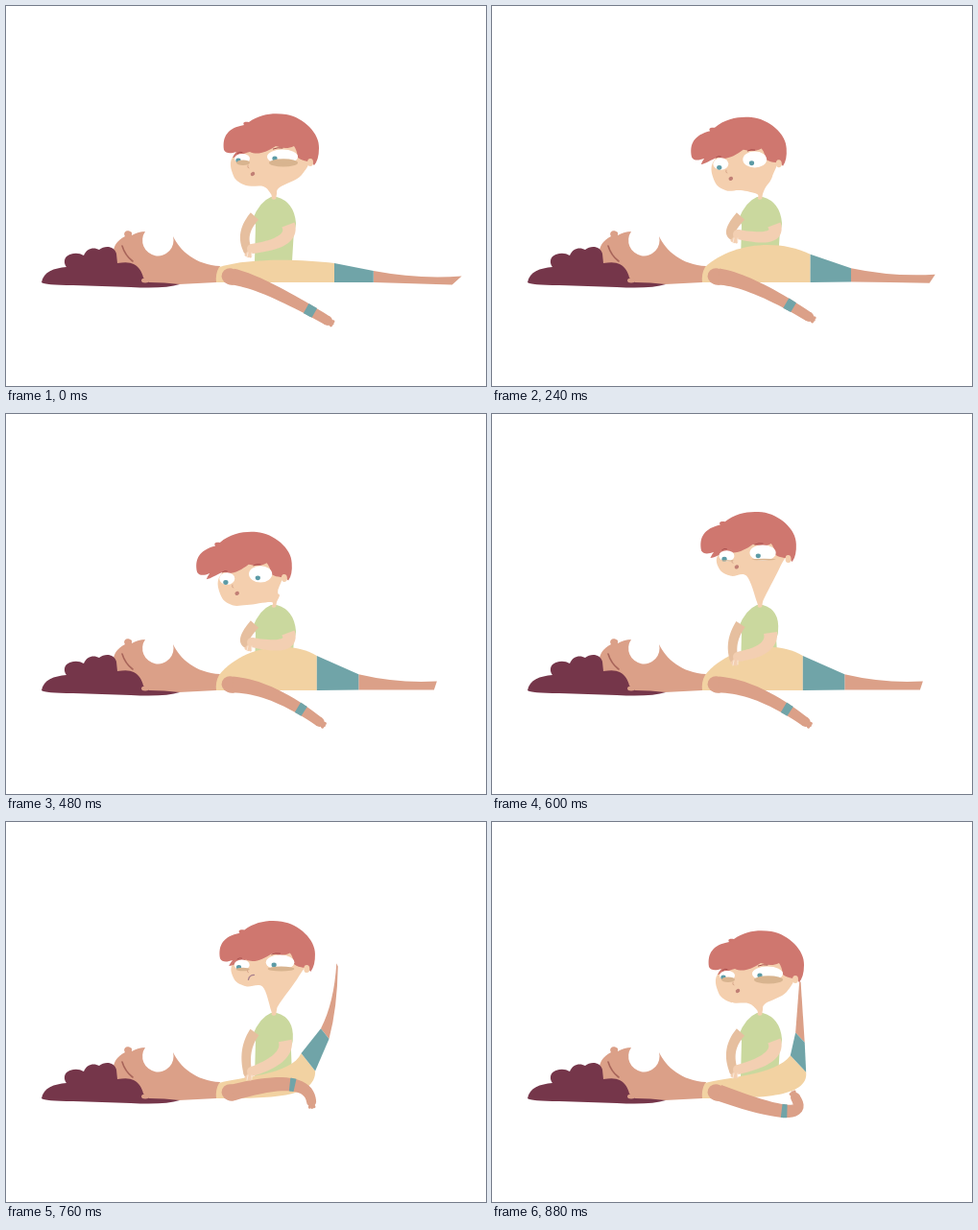
An HTML page with a canvas for the animation above (0.92 s loop, 500 by 396 pixels).

```html
<!DOCTYPE html>
<html lang="en">
<head>
<meta charset="utf-8">
<title>First aid</title>
<style>
html, body { margin: 0; width: 100%; height: 100%; overflow: hidden; background: #fff; }
canvas { display: block; width: 500px; height: 396px; }
</style>
</head>
<body>
<canvas id="stage" width="500" height="396"></canvas>
<script>
const ctx = document.getElementById('stage').getContext('2d');
const LOOP = 920, STEP = 40;
const C = {
  tan: '#dba088', tanDark: '#a8655a', maroon: '#75364a', cream: '#f2d2a2', teal: '#70a4a8',
  red: '#cf776f', redDark: '#a94f4d', pale: '#f4cfae', arm: '#f3cfb2', armDark: '#e6bf9f',
  shirt: '#cad89e', bag: '#d8b48f', iris: '#5c9ba6'
};

// x, y: head shift; turn: face shift inside the head; jaw: face height;
// hand: height of the pressing hands; hump: belly rise; swing: legs thrown up
const KEYS = [
  { at: 0, x: 0, y: 0, turn: 0, jaw: 1, hand: 255, hump: 0, swing: 0 },
  { at: 120, x: 0, y: -2, turn: 0, jaw: 1, hand: 247, hump: 1, swing: 0 },
  { at: 240, x: -19, y: 4, turn: 12, jaw: 1, hand: 240, hump: .4, swing: 0 },
  { at: 480, x: -28, y: 11, turn: 13, jaw: 1, hand: 240, hump: .7, swing: 0 },
  { at: 600, x: -9, y: -10, turn: 8, jaw: .75, hand: 255, hump: .7, swing: 0 },
  { at: 760, x: -4, y: -9, turn: 4, jaw: .8, hand: 262, hump: 0, swing: .7 },
  { at: 880, x: -1, y: 1, turn: 0, jaw: 1, hand: 260, hump: 0, swing: 1 }
];

const { PI, sin, cos, sqrt, max } = Math;
const mix = (a, b, k) => a + (b - a) * k;

function poseAt(t) {
  const i = KEYS.findLastIndex(k => k.at <= t);
  const a = KEYS[i], b = KEYS[i + 1] || a;
  const u = a === b ? 0 : (t - a.at) / (b.at - a.at);
  const k = u * u * (3 - 2 * u), pose = {};
  for (const name in a) pose[name] = mix(a[name], b[name], k);
  pose.lift = sin(pose.swing * PI / 2);
  return pose;
}

function fill(path, color) {
  ctx.fillStyle = color;
  ctx.fill(new Path2D(path));
}

function line(path, color, width) {
  ctx.strokeStyle = color;
  ctx.lineWidth = width;
  ctx.lineCap = 'round';
  ctx.stroke(new Path2D(path));
}

function oval([x, y], rx, ry, color, turn = 0) {
  ctx.beginPath();
  ctx.ellipse(x, y, rx, ry, turn, 0, PI * 2);
  ctx.fillStyle = color;
  ctx.fill();
}

// closed smooth outline through points
function blob(pts, color) {
  const at = i => pts[(i + pts.length) % pts.length];
  let d = `M${at(0)}`;
  pts.forEach((q, i) => {
    const p = at(i - 1), r = at(i + 1), s = at(i + 2);
    const c1 = q.map((c, k) => c + (r[k] - p[k]) / 6);
    const c2 = r.map((c, k) => c - (s[k] - q[k]) / 6);
    d += `C${c1} ${c2} ${r}`;
  });
  fill(d + 'Z', color);
}

// tapered limb along a quadratic, optionally only a part of it
function limb([p, q, r], w0, w1, color, from = 0, to = 1) {
  const left = [], right = [], N = 20;
  for (let i = 0; i <= N; i++) {
    const t = mix(from, to, i / N), w = mix(w0, w1, t) / 2;
    const [x, y] = [0, 1].map(k => mix(mix(p[k], q[k], t), mix(q[k], r[k], t), t));
    const [dx, dy] = [0, 1].map(k => mix(q[k] - p[k], r[k] - q[k], t));
    const n = w / Math.hypot(dx, dy);
    left.push([x + dy * n, y - dx * n]);
    right.unshift([x - dy * n, y + dx * n]);
  }
  fill('M' + left.concat(right).join('L') + 'Z', color);
}

function fingers([x, y], a, size, color) {
  for (const spread of [-.4, 0, .4]) {
    line(`M${x} ${y}l${cos(a + spread) * size} ${sin(a + spread) * size}`, color, 3);
  }
}

function lyingHead() {
  fill('M112 258Q111 247 124 240C121 235 127 232 131 236L131 239Q138 235 145 235' +
    'A16.2 16.2 0 1 0 174 240C181 255 198 270 223 271L219 288L180 290L146 290L118 275Z', C.tan);
  fill('M37 288C39 277 50 273 63 272C60 268 59 260 70 258Q76 257 81 260C84 252 92 251 97 254' +
    'C103 249 113 250 115 258L116 268Q128 266 133 269C139 272 142 278 143 283L149 288' +
    'Q165 288 181 290Q165 295 130 293L70 291Q40 291 37 288Z', C.maroon);
  oval([145, 286], 4, 2.5, C.tan);
  line('M121 250Q124 260 132 266', C.tanDark, 1.6);
}

function lyingBody({ hump, swing, lift }) {
  const rise = sqrt(hump), shrink = 1 - .33 * swing * swing;
  const top = 268 - 23 * hump;
  const go = ([x, y], a, d) => [x + cos(a) * d, y + sin(a) * d];

  const waist = [mix(342 - 26 * hump, 294 + 25 * swing, lift),
    mix((top + 288) / 2, 235 + 17 * swing, lift)];
  const thigh = (.1 + .16 * hump) * (1 - lift) - 1.5 * swing;
  const knee = go(waist, thigh, (41 + 5 * hump) * shrink);
  const foot = go(knee, mix(.045, -PI / 2, lift), (87 - 14 * hump * hump) * shrink);

  // both edges of the leg lie across this angle
  const across = PI / 2 - .75 * lift;
  const edges = (p, r) => [go(p, across, -r), go(p, across, r)];
  const [w1, w2] = edges(waist, mix((288 - top) / 2, 12, lift));
  const [k1, k2] = edges(knee, 6 + 3 * hump + lift);
  const [toe, heel] = edges(foot, 4.5 - 3.5 * swing);
  toe[0] += 5 * (1 - hump) * (1 - lift);
  heel[0] -= 5 * (1 - hump) * (1 - lift);
  const sag = (p, q, d) => go([(p[0] + q[0]) / 2, (p[1] + q[1]) / 2], across, d);
  const bow = sin(PI * swing);

  fill(`M${k1}Q${sag(k1, toe, 6 * (1 - swing) + 9 * bow)} ${toe}L${heel}` +
    `Q${sag(heel, k2, 8 * bow)} ${k2}Z`, C.tan);
  fill(`M219 288Q218 279 222 272C${255 - 12 * rise - 13 * lift} ${262 - 22 * rise + 4 * lift} ` +
    `${308 - 18 * rise - 12 * lift} ${264 - 36 * rise} ${w1}L${w2}` +
    `C${w2[0] + 3 * lift - 20 * (1 - lift)} 288 275 288 219 288Z`, C.cream);
  fill(`M${w1}L${k1}L${k2}L${w2}Z`, C.teal);
}

function lyingArm({ hump, swing, lift }) {
  const shoulder = [236, 282];
  const elbow = [268 + 24 * hump ** 3 + 67 * swing,
    288 - 6 * hump + 30 * swing - 60 * sin(PI * swing)];
  const wrist = [335 - 12 * hump - 19 * lift, 328 - 10 * hump - 41 * lift];
  const arm = [shoulder, elbow, wrist];
  const band = .86 - .08 * hump - .37 * lift;
  const a = Math.atan2(wrist[1] - elbow[1], wrist[0] - elbow[0]);
  oval([234, 282], 9.5, 8.5, C.tan, .4);
  limb(arm, 17, 10, C.tan);
  limb(arm, 17.5, 10.5, C.teal, band - .035, band + .035);
  oval(wrist, 5, 5, C.tan);
  fingers(wrist, a, 6, C.tan);
}

function shirt({ jaw }) {
  const side = 302 - 16 * (1 - jaw);
  fill(`M276 199Q264 204 257 222L260 228L259 266L298 266L${side - 2} 233` +
    `Q${side} 231 ${side} 226Q300 204 282 199Z`, C.shirt);
}

function kneelingArms({ hand, jaw }) {
  const pull = 32 * (1 - jaw);
  const left = [252, hand], right = [256, hand - 2];
  limb([[259, 219], [243 + pull / 2, 237], left], 11, 9, C.armDark);
  oval(left, 4.5, 4.5, C.armDark);
  limb([[294 - pull / 2, 228], [301 - pull, 247], right], 14, 10, C.arm);
  oval(right, 5, 5, C.arm);
  fingers([254, hand], 1.9, 6, C.arm);
  line(`M252 ${hand + 2}l-1 5M256 ${hand + 2}l0 4`, '#fbeee0', .8);
}

function kneelingHead({ x, y, turn, jaw, swing }) {
  const tilt = -.006 * turn, cx = 278, cy = 150;
  // head point to stage: squeeze towards the right, squash, tilt, shift
  const place = (px, py) => {
    const dx = px + turn * (316 - px) / 79 - cx, dy = (py - cy) * jaw;
    return [cx + x + dx * cos(tilt) - dy * sin(tilt), cy + y + dx * sin(tilt) + dy * cos(tilt)];
  };

  blob([place(238, 155), place(237, 177), place(250, 187), place(268, 188),
    [276, 196], [277, 201], [281, 201], [282, 196], [285, 189],
    place(308, 176), place(316, 152), place(281, 132)], C.pale);

  ctx.save();
  ctx.translate(cx + x, cy + y);
  ctx.rotate(tilt);
  ctx.translate(-cx, -cy);
  fill('M227 150C225 136 231 127 248 124C246 121 249 120 253 121C265 112 280 111 292 113' +
    'C310 116 327 133 326 148Q326 160 321 166C317 160 310 163 304 158Q303 150 300 146' +
    'C292 150 285 147 281 146C272 152 262 156 254 152C246 154 241 158 236 158' +
    'Q238 154 240 152C234 154 229 154 227 150Z', C.red);
  oval([317, 163], 3, 4, C.pale);
  ctx.restore();

  const tired = max(0, 1 - turn / 10);
  const eye = (px, py, rx, ry, look) => {
    const [ex, ey] = place(px, py);
    oval([ex, ey], rx, ry, '#fff');
    oval([ex - look, ey + 2 + turn * .15], 2.6, 2.4, C.iris);
    if (tired) oval([ex + 1, ey + ry * .85], rx - 1, ry * .55 * tired, C.bag);
    line(`M${ex - rx * .6} ${ey - ry - .5}q${rx * .3} -2 ${rx * .6} -1`, C.redDark, 1);
  };
  eye(246, 159, 8, 5 + turn * .1, 4 - turn * .2);
  eye(288, 157, 16 - turn * .3, 7.5 + turn * .08, 8 - turn * .4);

  const [nx, ny] = place(253, 168), [mx, my] = place(257, 175);
  line(`M${nx - 1} ${ny - 2}q-1 3 1 3`, '#d9a98c', 1);
  if (swing > .4 && swing < .9) line(`M${mx - 4} ${my + 3}q1 -5 6 -5`, '#a87f8c', 1.3);
  else oval([mx, my], 2.3, 2, '#c17f75', -.4);
}

function draw(t) {
  const pose = poseAt(t);
  ctx.fillStyle = '#fff';
  ctx.fillRect(0, 0, 500, 396);
  lyingHead();
  shirt(pose);
  lyingBody(pose);
  lyingArm(pose);
  kneelingArms(pose);
  kneelingHead(pose);
}

const start = performance.now();
function tick() {
  const t = (performance.now() - start) % LOOP;
  draw(Math.floor(t / STEP) * STEP);
  requestAnimationFrame(tick);
}
tick();
</script>
</body>
</html>
```
